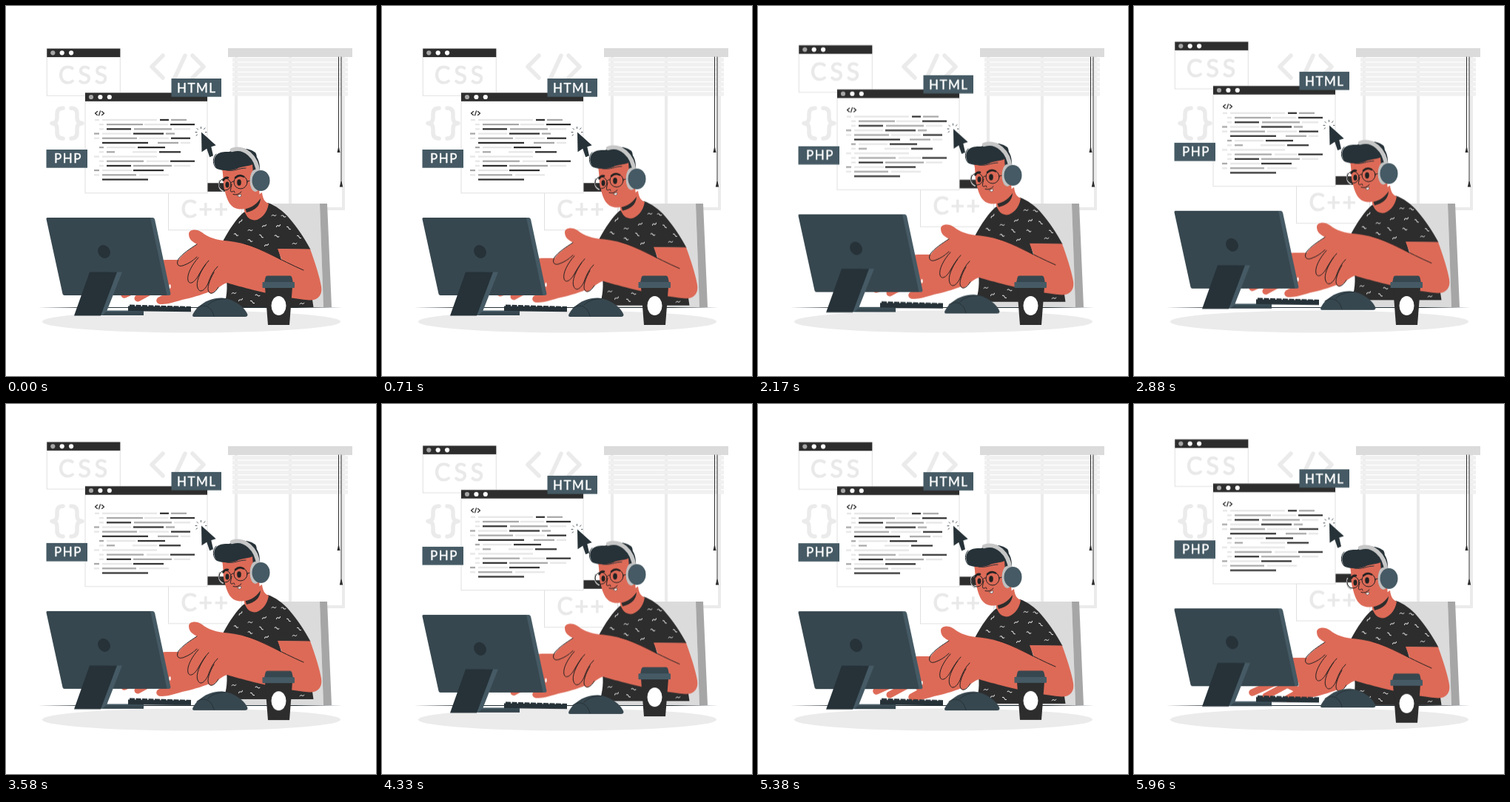
Animation of 500 by 500 pixels, one loop 6 s. Source, as an HTML page:

```html
<!DOCTYPE html>
<html lang="en">
<head>
<meta charset="utf-8">
<title>Programmer at work</title>
<style>
  html, body { margin: 0; width: 100%; height: 100%; overflow: hidden; background: #fff; }
  svg { display: block; width: 100%; height: 100%; }
  text { font-family: Lato, "Open Sans", sans-serif; stroke-linejoin: round; }
  .line { fill: none; stroke-linecap: round; stroke-linejoin: round; }
  .faint { fill: #e9e9e9; stroke: #e9e9e9; stroke-width: 1.1; font-size: 32px; }
  .tag { fill: #fff; stroke: #fff; stroke-width: .4; font-size: 17px; letter-spacing: 1.5px; }
  .skin { fill: #dd6a57; }
  .ink { fill: #2d2d2d; }
  .slate { fill: #37474f; }
  .steel { fill: #455a64; }
  .night { fill: #263238; }
  .thin { stroke: #222; stroke-width: 1; }
</style>
</head>
<body>
<svg viewBox="0 0 500 500">
  <!-- window with blinds -->
  <path d="M311 69V274H456V69M384 69V274" fill="none" stroke="#ebebeb" stroke-width="4"/>
  <g id="blinds"></g>
  <rect x="300" y="57" width="168" height="12" fill="#dbdbdb"/>
  <path class="line" d="M449.500 69V194M453 69V241" stroke="#2d2d2d"/>
  <path class="ink" d="M449 191h1l1.500 7h-4zM452.500 237h1l1.700 7.500h-4.400z"/>

  <!-- code symbols on the wall -->
  <g class="line" stroke="#ebebeb" stroke-width="5.500">
    <path d="M212 67L197 82L212 97M242 67L228 97M252 67L267 82L252 97"/>
    <path d="M77 138Q69 138 69 146V151Q69 158 62 158.500Q69 159 69 166V171Q69 179 77 179"/>
    <path d="M88 138Q96 138 96 146V151Q96 158 103 158.500Q96 159 96 166V171Q96 179 88 179"/>
  </g>

  <g class="float">
    <g id="panels"></g>
    <text class="faint" x="71" y="104.800" letter-spacing="5">CSS</text>
    <text class="faint" x="236.500" y="286.300" letter-spacing="2.500">C++</text>
    <g id="editor"></g>
    <path class="line" d="M123.500 142.400L120.500 144.900L123.500 147.400M127.500 141.900L125.500 147.900M129.500 142.400L132.500 144.900L129.500 147.400" stroke="#2d2d2d" stroke-width="1.300"/>
    <g id="code"></g>
    <rect class="steel" x="54.500" y="194" width="55.500" height="24.700"/>
    <text class="tag" x="65" y="212.400">PHP</text>
    <rect class="steel" x="223.500" y="98" width="67.500" height="24.700"/>
    <text class="tag" x="231" y="116.600">HTML</text>
    <path class="night" d="M264 170.600L283.700 188.300L277.300 190.300L280 202.200L275.200 204.200L271.300 192.800L264.500 197.300Z"/>
    <path class="line" d="M258.500 174l-1.500 1M258 170.500h-2M259.500 167l-1.500-1.500M263.500 165.500v-2M267.500 166.500l1.500-1.700M269.500 170.500h1.500" stroke="#263238" stroke-width=".8"/>
  </g>

  <!-- chair and desk -->
  <path d="M345 267H424L429 407H296Z" fill="#dbdbdb"/>
  <path d="M424 267H434L440 407H429Z" fill="#a6a6a6"/>
  <path class="night" d="M43 407.500L110 407.100H390L455 407.500L390 407.900H110Z"/>
  <ellipse cx="250.500" cy="426.500" rx="201.500" ry="15" fill="#ebebeb"/>

  <g id="man">
    <!-- far hand -->
    <g class="line" stroke="#dd6a57">
      <path d="M160 390L200 372M208 398L245 378" stroke-width="9.500"/>
      <path d="M178 395L215 375" stroke-width="9"/>
    </g>
    <path class="skin" d="M185 374C194 352 203 343.500 216 343H240L285 346L302 368C292 382 262 392 238 397C225 401 214 404 207 402.500L215 388Z"/>
    <ellipse cx="221.500" cy="379" rx="1.200" ry="3" fill="#fff"/>

    <!-- shirt and neck -->
    <path class="ink" d="M321 279L354 266C363 269 375 277 383 287C395 301 404 315 411.500 329L368 328.500L374 350L300 345L293 318C303 300 311 288 321 279ZM298 370C300 388 296 398 295 407H415.500L413 390Z"/>
    <path class="skin" d="M322 268L346 252C347 261 350 265 355 267C353 280 344 289 336 289.500C328 289 325 284 322 277Z"/>
    <path class="ink" d="M323 272Q336 271 344 260Q343 275 325 279Z"/>
    <g id="squiggles" class="line" stroke="#fff" stroke-width=".9"></g>

    <!-- near arm -->
    <path class="skin" d="M300 317.500C285 317 272 312 265 306C257 300 247 302 247 308C247 316 253 319 258 322C250 328 240 334 234 342C229 350 233 353 240 350.500L254 343C249 352 244 362 246 371C248 378 254 373 259 365C257 375 258 386 264 385.500C269 384 271 379 274 374C271 385 274 390 279 388C286 383 288 377 299 374C308 377 320 380 335 384C360 390 390 396 410 397.500C422 398 428 390 426 379C424 366 417 345 411 328.500L367 328L373 344C350 329 322 320 300 317.500Z"/>
    <g class="line thin">
      <path d="M322 321C346 328 370 343 402 357"/>
      <path d="M258 322C249 328 239 334 233 342C229 350 234 353 240 350.500C247 348 253 344 258 339"/>
      <path d="M260 340C251 350 244 363 246 371C248 377 254 374 259 366C263 359 268 350 274 344"/>
      <path d="M270 349C262 360 256 374 259 381C262 389 269 384 273 375C276 366 280 358 286 352"/>
      <path d="M281 360C275 370 271 382 274 386C277 391 283 387 287 380"/>
    </g>

    <!-- head -->
    <path class="night" d="M330 199C342 201 344 214 343 232L334 236L327 214Z"/>
    <path class="skin" d="M291 217C295 228 292 240 296 251C299 263 303 273 315 274.500C327 275.500 337 270 343 261L341 228H334L333 213Z"/>
    <path class="night" d="M285 220C279 212 280 201 290 198C296 196 301 198 304 196C313 190 330 192 337 198C341 204 338 213 331 215C323 217 317 217 312 220C302 223 294 223 285 220Z"/>
    <path class="line" d="M284 200C279 205 279 214 284 219M298 222C308 224 315 219 324 219" stroke="#263238"/>
    <path class="line" d="M288.500 236C286.500 242 288.500 248 293 250" stroke="#bdbdbd" stroke-width="2"/>
    <g class="line thin">
      <circle cx="296" cy="241" r="8"/>
      <circle cx="317" cy="238" r="9"/>
      <path d="M304 239Q306 236 308 237M326 237L334 235"/>
      <path d="M305 241C304 247 302 251 305 251C308 251 308 248 309 252M307 254.500Q313 256.500 318 251"/>
    </g>
    <path class="line" d="M293.500 235.500Q296 231 300 232M310 232Q315 227 321 230.500" stroke="#222" stroke-width="2.600"/>
    <g fill="#222">
      <ellipse cx="299" cy="241.500" rx="2.500" ry="4"/>
      <ellipse cx="315" cy="238.500" rx="2.800" ry="4.200"/>
    </g>
    <path d="M312 256Q315 256 317.500 254Q318.500 258 315.500 258Z" fill="#fff" stroke="#222" stroke-width=".5"/>

    <!-- headphones -->
    <path class="line" d="M305.500 194.500C322 189 339 203 341 226" stroke="#c7c7c7" stroke-width="5.500"/>
    <ellipse cx="337" cy="236" rx="7.500" ry="15" fill="#c0c0c0"/>
    <ellipse class="steel" cx="344.500" cy="236" rx="12" ry="14"/>
  </g>

  <g class="float">
    <path class="steel" d="M190 286H198Q200.500 286 201.200 289L222.500 389Q222.500 391 220 391H210Z"/>
    <path class="slate" d="M56 286H195L217.500 391H79Q77 391 76.500 389L54.500 288Q54 286 56 286Z"/>
    <ellipse class="night" cx="132.500" cy="332" rx="8" ry="9.300" transform="rotate(-35 132.500 332)"/>
    <path class="steel" d="M140 359.500H157L136.500 411.500H186V418H120Z"/>
    <path class="slate" d="M135 413.500H186V418H130Z"/>
    <path class="night" d="M113 359.500H150L128 418.500H92Z"/>
    <path class="night" d="M165 405.500L250 407V413.300L165 412.300Z"/>
    <path d="M167 405.500L250 408" stroke="#263238" stroke-width="4" stroke-dasharray="7 1.500"/>
    <path class="slate" d="M252 418C255 409 270 394.500 290 394.500C304 394.500 321 404 326.500 417Q326.500 420 323 420H254Q252 420 252 418Z"/>
    <path class="line" d="M258 408C269 401 278 407 281 419M273 404C279 398 287 396 297 395.500" stroke="#263238"/>
  </g>

  <g id="cup">
    <path class="slate" d="M353 364.500H384Q386 364.500 386.500 367L388 374H349L350.500 367Q351 364.500 353 364.500Z"/>
    <path class="ink" d="M350 380H387L383 431H354Z"/>
    <rect class="steel" x="346.500" y="373" width="43.500" height="8" rx="1"/>
    <ellipse cx="368.500" cy="405" rx="10" ry="13" fill="#fff"/>
  </g>
</svg>
<script>
const NS = "http://www.w3.org/2000/svg";
const find = id => document.getElementById(id);

function add(parent, tag, attrs) {
  const el = document.createElementNS(NS, tag);
  for (const key in attrs) el.setAttribute(key, attrs[key]);
  parent.appendChild(el);
}

function panel(parent, x, y, width, height) {
  add(parent, "rect", { x, y, width, height, fill: "#fff", stroke: "#e0e0e0" });
  add(parent, "rect", { x, y, width, height: 11.5, fill: "#2d2d2d" });
  ["#a6a6a6", "#fff", "#fff"].forEach((fill, i) =>
    add(parent, "circle", { cx: x + 8 + i * 12.4, cy: y + 5.7, r: 3.1, fill }));
}

panel(find("panels"), 55.3, 57.6, 99, 63.5);
panel(find("panels"), 219.5, 239.3, 99, 63.5);
panel(find("editor"), 107, 117.3, 165, 135.5);

for (let i = 0; i < 8; i++)
  add(find("blinds"), "rect", { x: 306, y: 70 + i * 6.6, width: 156, height: 5.4, fill: "#f0f0f0" });

// Each bar: tone (light, grey, black), start, end
const rows = [
  "l120-126 l130-204 b208-220 g223-244",
  "l126-132 g136-185 l187-219 b222-255",
  "l126-132 b136-169 g173-224 l227-249",
  "g119-126 l130-169 b172-213 g216-228",
  "l119-126 g130-177 l180-220 b223-249",
  "b130-192 g205-233 l236-249",
  "g126-132 l136-175 b178-215",
  "l126-132 g136-147 l171-204 b207-236",
  "l119-126 l130-204",
  "l126-132 g136-186 l190-220 b222-255",
  "l126-132 b136-169 g172-224 l227-249",
  "g119-126 l130-170 b172-213",
  "l119-126 g130-176 l180-220",
  "b130-192"
];
const tones = { l: "#e6e6e6", g: "#a6a6a6", b: "#2d2d2d" };
rows.forEach((row, i) => row.split(" ").forEach(bar => {
  const [from, to] = bar.slice(1).split("-").map(Number);
  add(find("code"), "rect", { x: from, y: 152.8 + i * 6.2, width: to - from, height: 2.2, fill: tones[bar[0]] });
}));

// Shirt pattern
[[317, 291], [311, 309], [330, 303], [349, 297], [345, 311], [330, 317], [362, 283],
 [368, 297], [382, 300], [366, 311], [390, 321], [352, 323], [396, 312], [375, 284],
 [308, 388], [317, 397], [333, 400], [340, 391], [400, 402]].forEach(([x, y], i) =>
  add(find("squiggles"), "path", {
    d: "M-3 .5Q-1.500-1.500 0 0T3-.5",
    transform: `translate(${x} ${y}) rotate(${i * 67 % 90 - 40})`
  }));

// Steps are [time in ms, vertical shift]
const LOOP = 6000;
function bob(el, steps) {
  el.animate(
    steps.map(([t, y]) => ({ offset: t / LOOP, transform: `translateY(${y}px)` })),
    { duration: LOOP, iterations: Infinity, easing: "linear" });
}

document.querySelectorAll(".float").forEach(el =>
  bob(el, [[0, 0], [1500, 0], [3000, -10], [4500, 0], [6000, -10]]));
bob(find("man"), [[0, 0], [3000, -10], [6000, 0]]);
bob(find("cup"), [[0, 0], [3000, 0], [4500, -10], [6000, 0]]);
</script>
</body>
</html>
```
